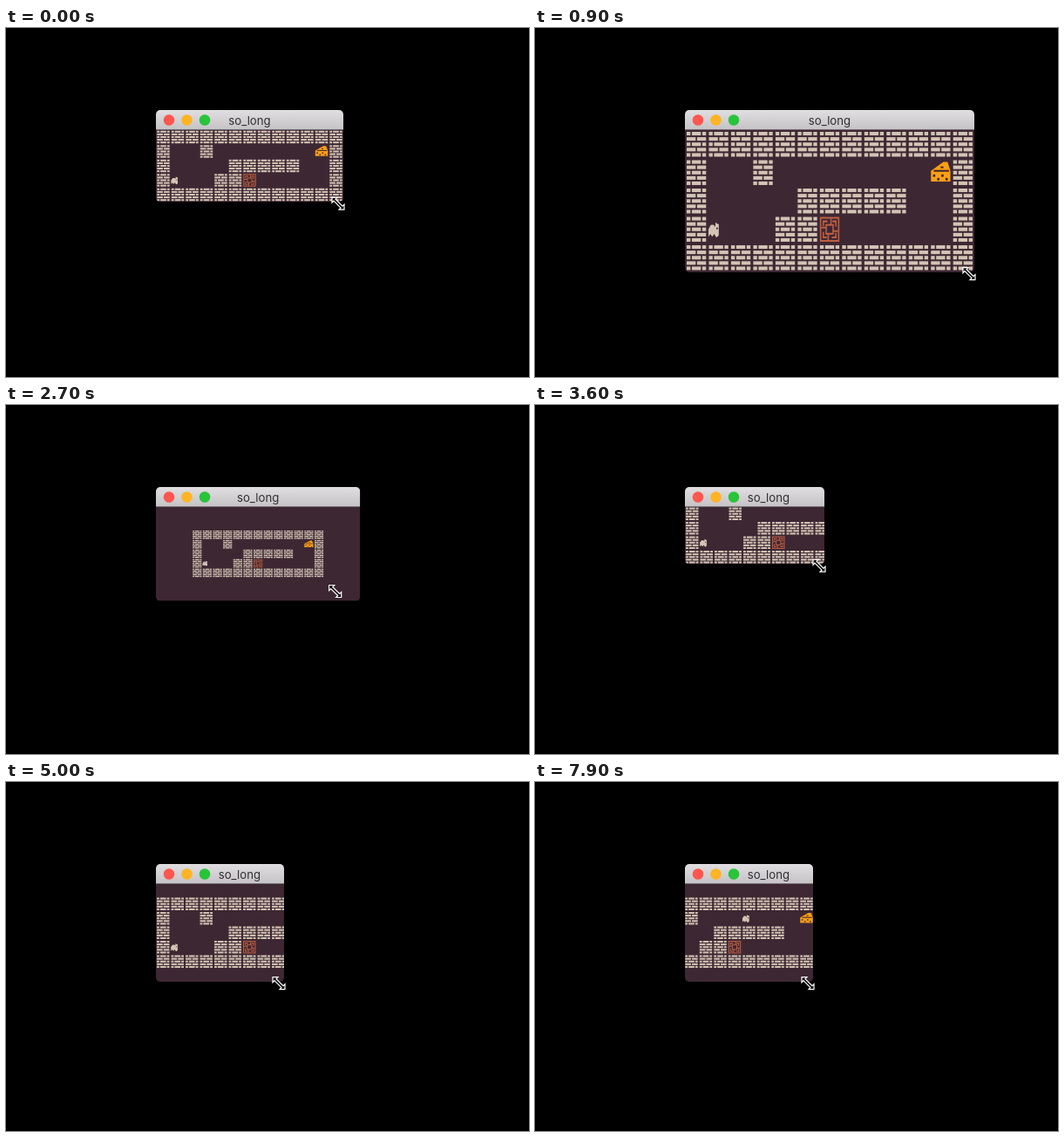
Write an HTML page with a canvas that moves like this. It is 600 px wide and 400 px high and loops after 8 s.

```html
<!DOCTYPE html>
<html>
<head>
<meta charset="utf-8">
<style>
  html, body { margin: 0; width: 100%; height: 100%; overflow: hidden; background: #000; }
  canvas { display: block; }
</style>
</head>
<body>
<canvas id="stage" width="600" height="400"></canvas>
<script>
const ctx = document.getElementById('stage').getContext('2d');
const LOOP = 8000, STEP = 100;
const LEFT = 172, TOP = 94, CONTENT = 116.5, TILE = 16.5;
const BG = '#3d2733', STONE = '#d2c4b4', CHEESE = '#fb9f14', DOOR = '#bf5f40';

// # wall, C cheese, E exit
const MAP = [
  '#############',
  '#  #       C#',
  '#    #####  #',
  '#   ##E     #',
  '#############'
];

// Pulls on the window's lower right corner
const HOME = { x: 387, y: 199.5 };
const DRAGS = [
  { from: 100, to: 600, x: 481, y: 263.5 },
  { from: 600, to: 900, x: 504, y: 280 },
  { from: 2100, to: 3200, x: 332, y: 182.5 },
  { from: 3800, to: 4400, x: 319, y: 229 }
];
// The view is laid out anew when the corner is let go; a drag only stretches it
const LAYOUTS = [0, 1000, 3600, 4500];

const FLIGHT = { start: 5200, perTile: 330, col: 1, row: 3, moves: 'RRURURRR' };

const clamp = (v, lo, hi) => Math.max(lo, Math.min(hi, v));
const smooth = p => p * p * (3 - 2 * p);

function corner(t) {
  let { x, y } = HOME;
  for (const d of DRAGS) {
    const p = smooth(clamp((t - d.from) / (d.to - d.from), 0, 1));
    x += (d.x - x) * p;
    y += (d.y - y) * p;
  }
  return { x, y };
}

function viewSize(t) {
  const { x, y } = corner(t);
  return [x - LEFT, y - CONTENT];
}

function batCell(t) {
  let { start, perTile, col, row, moves } = FLIGHT;
  [...moves].forEach((move, i) => {
    const p = clamp((t - start) / perTile - i, 0, 1);
    if (move === 'R') col += p; else row -= p;
  });
  return [col, row];
}

function polygon(...xy) {
  ctx.beginPath();
  for (let i = 0; i < xy.length; i += 2) ctx.lineTo(xy[i], xy[i + 1]);
  ctx.closePath();
}

function rect(color, x, y, w, h) {
  ctx.fillStyle = color;
  ctx.fillRect(x, y, w, h);
}

// Sprites are drawn on a 16 by 16 grid
function wall() {
  const pitch = 7.5;
  for (let row = 0; row < 5; row++) {
    const shift = row % 2 ? 0 : pitch / 2;
    for (let x = 1 - shift; x < 15; x += pitch) {
      const left = Math.max(1, x), right = Math.min(15, x + pitch - 1);
      rect(STONE, left, 1 + 3 * row, right - left, 2);
    }
  }
}

function cheese() {
  ctx.fillStyle = CHEESE;
  polygon(1, 7, 10, 2, 13, 2, 15, 7, 15, 13, 1, 13);
  ctx.fill();
  rect(BG, 3, 6.5, 11, 1);
  rect(BG, 8, 4.5, 2, 1);
  for (let i = 0; i < 4; i++) rect(BG, 2.5 + 3 * i, i % 2 ? 11 : 9, 1.6, 1.4);
}

function door() {
  ctx.strokeStyle = DOOR;
  ctx.lineWidth = 1;
  ctx.strokeRect(1.5, 1.5, 13, 13);
  ctx.translate(8, 8);
  ctx.strokeRect(-2.5, -2.5, 5, 5);
  for (let i = 0; i < 4; i++) {
    ctx.rotate(Math.PI / 2);
    ctx.beginPath();
    ctx.moveTo(1, -2.5);
    ctx.lineTo(1, -6);
    ctx.moveTo(-4.5, -2);
    ctx.lineTo(-4.5, -4.5);
    ctx.lineTo(-1.5, -4.5);
    ctx.stroke();
  }
}

function bat() {
  ctx.translate(8, 8);
  for (const side of [-1, 1]) {
    ctx.scale(side, 1);
    ctx.fillStyle = STONE;
    polygon(0, -3, 1, -3, 2, -4, 2.5, -1, 3.5, -2.5, 5.5, -2.5, 7.2, 0,
      7.2, 4, 6, 2.5, 4.5, 4, 3.2, 2.5, 1.5, 4.5, 0, 3.5);
    ctx.fill();
    rect(BG, 0.6, -1, 1, 1);
  }
}

const SPRITES = { '#': wall, C: cheese, E: door };

function drawTile(sprite, col, row) {
  ctx.save();
  ctx.translate(col * TILE, row * TILE);
  ctx.scale(TILE / 16, TILE / 16);
  sprite();
  ctx.restore();
}

// Centre a small map; otherwise follow the bat up to the map's edge
function scroll(view, cells, cell) {
  const size = cells * TILE;
  if (view >= size) return (view - size) / 2;
  return -clamp((cell + 0.5) * TILE - view / 2, 0, size - view);
}

function drawMap(t, w, h) {
  const [baseW, baseH] = viewSize(Math.max(...LAYOUTS.filter(l => l <= t)));
  const [col, row] = batCell(t);
  ctx.save();
  ctx.translate(LEFT, CONTENT);
  ctx.scale(w / baseW, h / baseH);
  ctx.translate(scroll(baseW, MAP[0].length, col), scroll(baseH, MAP.length, row));
  MAP.forEach((line, y) => [...line].forEach((c, x) => {
    if (SPRITES[c]) drawTile(SPRITES[c], x, y);
  }));
  drawTile(bat, col, row);
  ctx.restore();
}

function drawTitleBar(w) {
  const shade = ctx.createLinearGradient(0, TOP, 0, CONTENT);
  shade.addColorStop(0, '#e0dee0');
  shade.addColorStop(1, '#c5c3c5');
  rect(shade, LEFT, TOP, w, CONTENT - TOP);
  ['#ff564f', '#fdb424', '#28c43a'].forEach((color, i) => {
    ctx.fillStyle = color;
    ctx.beginPath();
    ctx.arc(187 + 20.5 * i, 105.5, 6.3, 0, 7);
    ctx.fill();
  });
  ctx.fillStyle = '#302e30';
  ctx.font = '13.2px Inter, sans-serif';
  const textW = ctx.measureText('so_long').width;
  ctx.fillText('so_long', Math.max(243.7, LEFT + (w - textW) / 2), 110.8);
}

function drawCursor(x, y) {
  ctx.save();
  ctx.translate(x, y);
  polygon(-7, -7, -1, -7, -3, -5, 5, 3, 7, 1, 7, 7, 1, 7, 3, 5, -5, -3, -7, -1);
  ctx.fillStyle = '#000';
  ctx.fill();
  ctx.strokeStyle = '#fff';
  ctx.lineWidth = 1.2;
  ctx.stroke();
  ctx.restore();
}

function draw(t) {
  const [w, h] = viewSize(t);
  rect('#000', 0, 0, 600, 400);
  ctx.save();
  ctx.beginPath();
  ctx.roundRect(LEFT, TOP, w, CONTENT - TOP + h, 5);
  ctx.clip();
  rect(BG, LEFT, CONTENT, w, h);
  drawMap(t, w, h);
  drawTitleBar(w);
  ctx.restore();
  // The window trails the pointer by one step
  const grip = corner(t + STEP);
  drawCursor(grip.x - 6, grip.y + 1.7);
}

function frame(now) {
  draw(Math.floor(now % LOOP / STEP) * STEP);
  requestAnimationFrame(frame);
}
requestAnimationFrame(frame);
</script>
</body>
</html>
```
